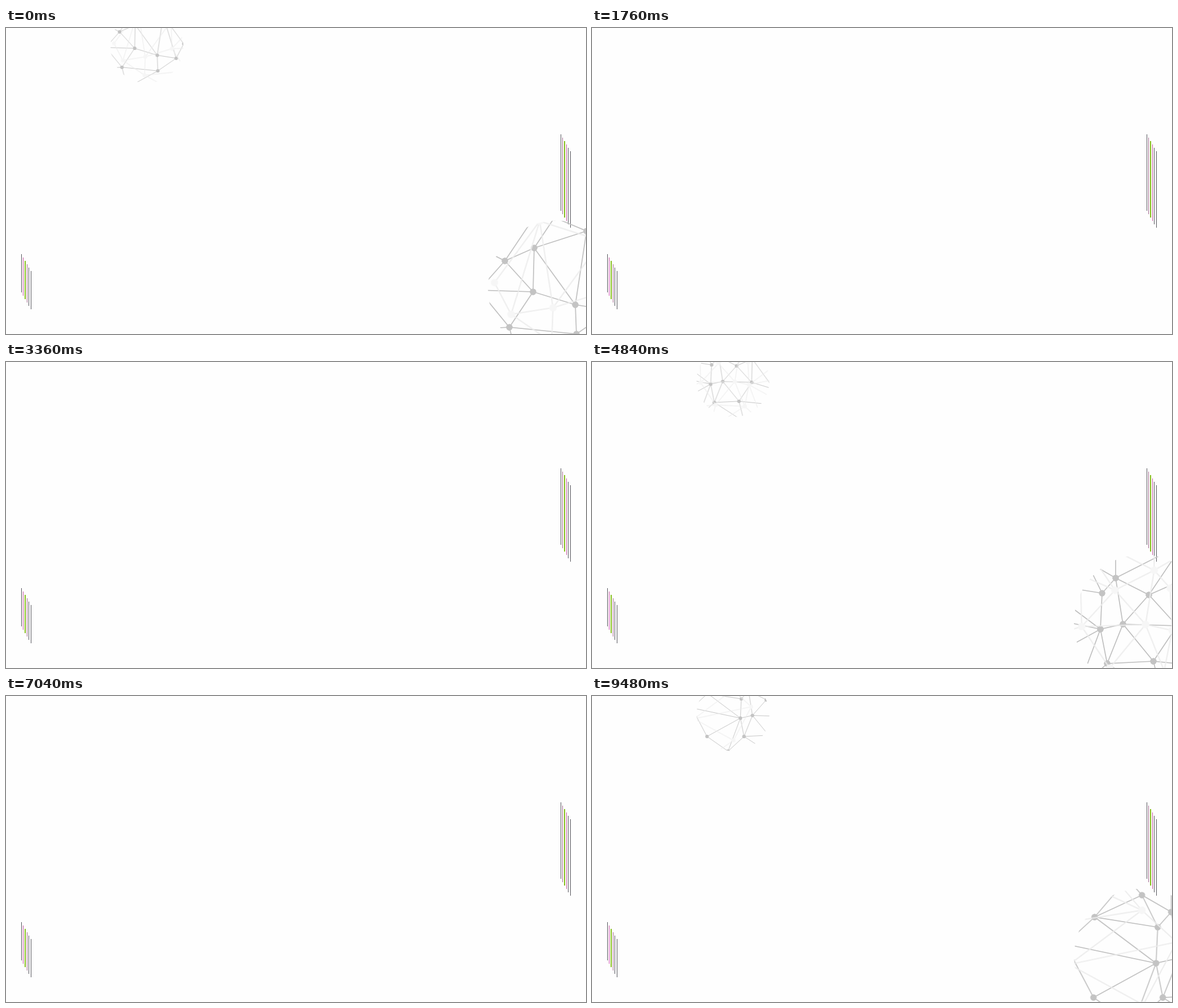
Animation, 1029 px wide and 544 px high, one loop 9520 ms. Source, as an HTML page without scripts:

```html
<!DOCTYPE html>
<html lang="en">
<head>
<meta charset="utf-8">
<title>Network globes</title>
<style>
  html, body { margin: 0; width: 100%; height: 100%; overflow: hidden; background: #fefefe; }
  svg { display: block; width: 1029px; height: 544px; }

  /* Each bar steps right and down from the one before */
  .bars { shape-rendering: crispEdges; fill: #55555c; }
  .bars rect { width: 1px; height: var(--h); transform: translate(calc(var(--i) * 3.35px), calc(var(--i) * 6px)); }
  .bars rect:nth-child(1) { --i: 0; }
  .bars rect:nth-child(2) { --i: 1; }
  .bars rect:nth-child(3) { --i: 2; }
  .bars rect:nth-child(4) { --i: 3; }
  .bars rect:nth-child(5) { --i: 4; }
  .bars rect:nth-child(6) { --i: 5; }
  .bars .lime { width: 2px; x: -.5px; fill: #86bc1c; }
  .plum { fill: #a0668c; }
  .pink { fill: #c653a0; }

  /* The two layers slide past each other; markers draw the nodes */
  .front, .back { fill: none; stroke-width: 1.7; animation: slide 9.52s linear infinite; }
  .front { --way: 202.5px; stroke: #bfbfbf; marker: url(#dark); }
  .back { --way: -374px; stroke: #ececec; marker: url(#pale); }
  @keyframes slide {
    from { transform: translateX(0); }
    to { transform: translateX(var(--way)); }
  }

  .blink { animation: blink 1.36s step-end infinite; }
  @keyframes blink {
    0%, 20.2%, 32%, 49.6%, 61.4%, 73.1%, 90.8%, 100% { opacity: 1; }
    17.3%, 29%, 40.8%, 58.4%, 67.3%, 84.9% { opacity: 0; }
  }
</style>
</head>
<body>
<svg viewBox="0 0 1029 544">
  <defs>
    <clipPath id="disc"><circle cx="976" cy="463.5" r="121"/></clipPath>
    <marker id="dark" markerUnits="userSpaceOnUse" markerWidth="12" markerHeight="12" refX="6" refY="6">
      <circle cx="6" cy="6" r="5.5" fill="#c3c3c3" stroke="none"/>
    </marker>
    <marker id="pale" markerUnits="userSpaceOnUse" markerWidth="12" markerHeight="12" refX="6" refY="6">
      <circle cx="6" cy="6" r="5.5" fill="#f6f6f6" stroke="none"/>
    </marker>

    <path id="net" d="
      M638 441L688 536L758 585L799 475L688 536
      M826 330V384L802 411L799 475L638 441L690 393
      M758 585L811 536L910 600L893 532L1012 544L910 600
      M799 475L690 393L748 325L774 354L690 393L802 411L774 354L826 384L839 466L799 475L811 536
      M893 532L811 536L839 466L893 532L935 469L839 466L885 414
      M935 469L885 414L826 384L946 323L885 414L937 391L935 469L1010 492
      M937 391L1010 492L1030 361L937 391L973 337L1030 361L1073 502L1010 492L1012 544L1073 502L1098 454L1030 361"/>
    <use id="mirror" href="#net" transform="matrix(-1.18 0 0 1.175 2162.3 -80.9)"/>
  </defs>

  <g class="bars" style="--h: 68px" transform="translate(27 402)">
    <rect/><rect class="pink"/><rect class="lime"/><rect class="plum"/><rect/><rect/>
  </g>
  <g class="bars" style="--h: 136px" transform="translate(984 189)">
    <rect/><rect class="plum"/><rect class="lime"/><rect class="pink"/><rect/><rect/>
  </g>

  <g class="blink">
    <g clip-path="url(#disc)">
      <g class="front"><use href="#net"/></g>
      <g class="back"><use href="#mirror"/></g>
    </g>
    <g transform="translate(-271.1 -214.3) scale(.534)">
      <g clip-path="url(#disc)">
        <g class="front"><use href="#net"/></g>
        <g class="back"><use href="#mirror"/></g>
      </g>
    </g>
  </g>
</svg>
</body>
</html>
```
